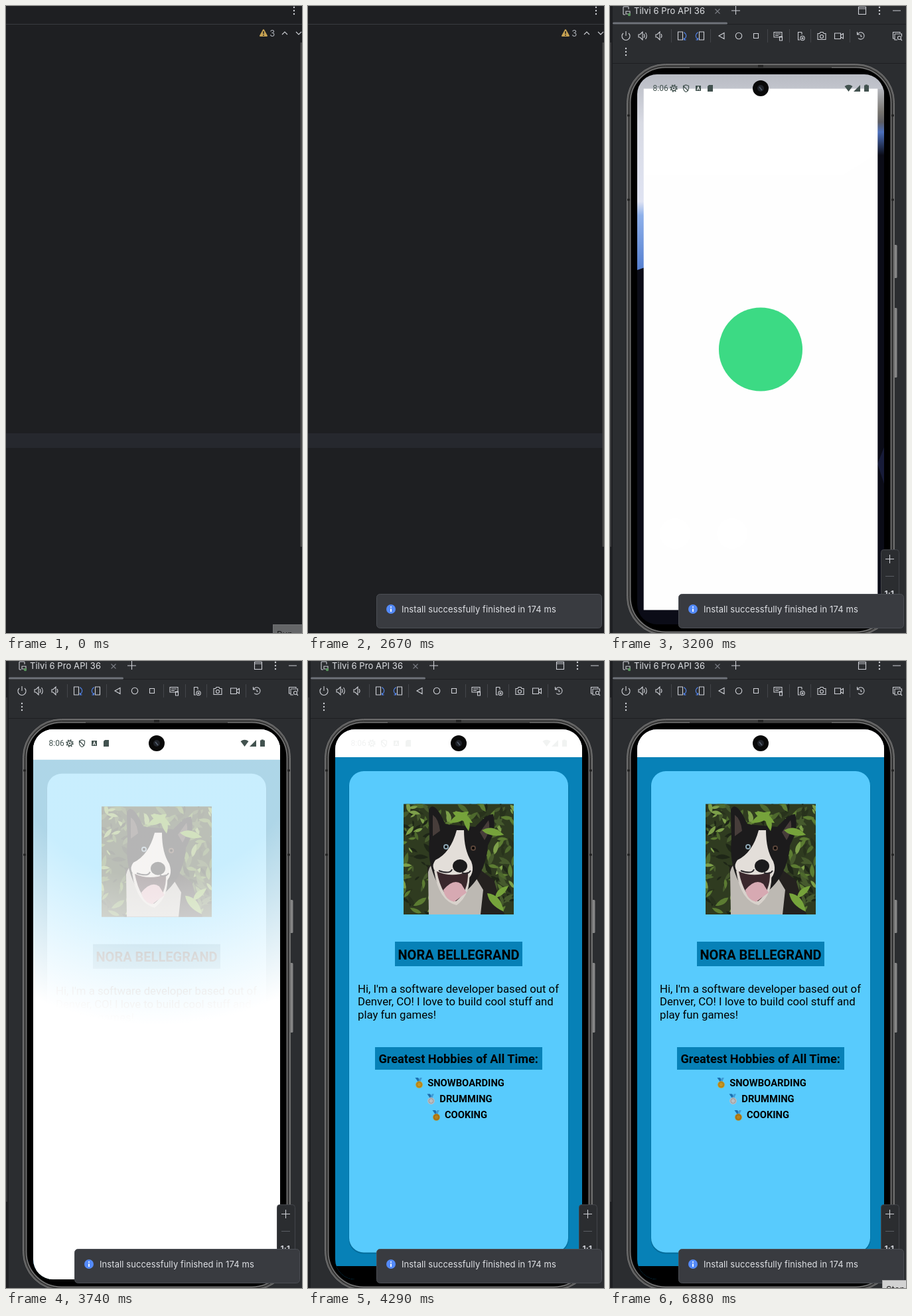
An HTML page that plays this animation: 446x945 px, repeating every 6.95 s.

```html
<!DOCTYPE html>
<html lang="en">
<head>
<meta charset="utf-8">
<style>
html, body { margin: 0; width: 100%; height: 100%; overflow: hidden; background: #1e1f22; }
svg { display: block; width: 446px; height: 945px; }
text { font: 13px Inter, sans-serif; letter-spacing: .09px; }
.phone text { font-family: Roboto, sans-serif; letter-spacing: 0; }
.phone .bold { font-weight: 700; text-anchor: middle; }
.phone .body text { font-size: 16.75px; }
.phone .hobby { font-size: 14.75px; }
.line { fill: none; stroke: #ced0d6; stroke-width: 1.1; }
.dots { fill: #ced0d6; }
</style>
</head>
<body>
<svg viewBox="0 0 446 945">
  <defs>
    <clipPath id="screen"><rect x="41" y="103" width="372" height="829" rx="30"/></clipPath>
    <clipPath id="photo"><rect x="144" y="215.500" width="166" height="166.500"/></clipPath>
    <linearGradient id="sky" x1="0" y1="103" x2="0" y2="398" gradientUnits="userSpaceOnUse">
      <stop stop-color="#b8bbc3"/><stop offset=".25" stop-color="#d9dbe4"/>
      <stop offset=".65" stop-color="#dfe3f2"/><stop offset=".72" stop-color="#8eb0ea"/><stop offset="1" stop-color="#557fd0"/>
    </linearGradient>
    <linearGradient id="stone" x1="0" y1="125" x2="0" y2="225" gradientUnits="userSpaceOnUse">
      <stop stop-color="#b5b7bd"/><stop offset=".35" stop-color="#77746f"/><stop offset=".5" stop-color="#5d5d62"/>
      <stop offset=".65" stop-color="#4c70bd"/><stop offset="1" stop-color="#0b0c17"/>
    </linearGradient>
    <radialGradient id="vanish" cx="227" cy="103" r="900" gradientUnits="userSpaceOnUse">
      <stop id="inner" stop-color="#fff"/><stop offset="1" stop-color="#fff"/>
    </radialGradient>
    <g id="medal">
      <path d="M-5.500-8H-1L3-1.500H-1Z" fill="#1c6fae"/><path d="M5-8H1.500L-1-2H2Z" fill="#3f9bd6"/>
      <circle cx=".5" cy="2.500" r="5.300"/><circle cx=".5" cy="2.500" r="3.500" fill="none" stroke="#0003"/>
    </g>
    <path id="leaf" d="M0 0Q14-13 34 0Q14 9 0 0Z"/>
  </defs>

  <rect width="446" height="945" fill="#1e1f22"/>
  <g id="editor">
    <rect y="27" width="446" height="1" fill="#393b40"/>
    <rect y="644" width="444" height="22" fill="#26282e"/>
    <rect x="443.500" y="55" width="2.500" height="760" fill="#484848"/>
    <rect y="944" width="446" height="1" fill="#17181a"/>
    <g class="dots"><circle cx="434" cy="2" r="1.200"/><circle cx="434" cy="7" r="1.200"/><circle cx="434" cy="12" r="1.200"/></g>
    <path d="M388 36L393 45H383Z" fill="#c7a252" stroke="#c7a252" stroke-width="2" stroke-linejoin="round"/>
    <path d="M388 38V42M388 43.300V45" stroke="#1e1f22" stroke-width="1.500"/>
    <text x="397.300" y="46" fill="#a9adb4">3</text>
    <path class="line" d="M416 43L420 39L424 43M437 39L441 43L445 39"/>
    <g id="runTip">
      <rect x="402.500" y="932.500" width="50" height="20" fill="#d0d0d0" stroke="#eee"/>
      <text x="408" y="951.500" fill="#000">Run</text>
    </g>
  </g>

  <g id="device">
    <rect x="4" width="442" height="945" fill="#2b2d30"/>
    <rect y="55" width="2" height="760" fill="#38393b"/>
    <rect x="4" y="27" width="442" height="1" fill="#1e1f22"/>
    <rect x="4" y="86" width="442" height="1" fill="#1e1f22"/>
    <rect x="4" y="24.500" width="173" height="3" rx="1.500" fill="#6f737a"/>
    <text x="36" y="12" fill="#dfe1e5">Tilvi 6 Pro API 36</text>
    <path class="line" d="M20 2Q20 1 21 1H27Q28 1 28 2V5M20 2V12Q20 13 21 13H23M24 8H30V12H24ZM183 7H196M189.500 0V13M374.500 1.500H385.500V12.500H374.500ZM374.500 4H385.500M426 7H438"/>
    <circle cx="29" cy="13" r="2.200" fill="#57965c"/>
    <path class="line" d="M158.500 4.500L165.500 11.500M165.500 4.500L158.500 11.500" style="stroke:#7b7e85"/>
    <g class="dots"><circle cx="406" cy="2" r="1.200"/><circle cx="406" cy="7" r="1.200"/><circle cx="406" cy="12" r="1.200"/>
      <circle cx="24" cy="64" r="1.200"/><circle cx="24" cy="69" r="1.200"/><circle cx="24" cy="74" r="1.200"/></g>
    <path d="M92.500 35V55M151.500 35V55M237.500 35V55M270.500 35V55M302.500 35V55M361.500 35V55" stroke="#43454a"/>
    <g class="line">
      <path d="M24 38V45M20 41A6 6 0 1 0 28 41"/>
      <path id="horn" d="M43 43H45L49 39V51L45 47H43ZM51 42Q53 45 51 48"/><path d="M53.500 40Q57 45 53.500 50"/>
      <use href="#horn" x="26"/>
      <path d="M102.500 39H109.500V51H102.500ZM134.500 39H141.500V51H134.500Z"/>
      <path d="M111.500 39.500Q118 45 111.500 50.500M114.500 51H111.500V48M132.500 39.500Q126 45 132.500 50.500M129.500 51H132.500V48" stroke="#548af7"/>
      <path d="M172 40.500V49.500L164 45ZM216.500 41.500H223.500V48.500H216.500Z"/><circle cx="194" cy="45" r="4.700"/>
      <path d="M247 39.500H259V47H247ZM249 42H257M249 44.500H254M255.500 46H259.500V52H255.500Z"/>
      <path d="M289 39.500H283.500V51H286M289 39.500V43"/><circle cx="290" cy="48.500" r="3.200"/><circle cx="290" cy="48.500" r="1"/>
      <path d="M313 41.500H316L317 39.500H321L322 41.500H325V50.500H313Z"/><circle cx="319" cy="46" r="2.500"/>
      <path d="M338.500 41H347.500V49.500H338.500ZM347.500 44L351.500 41.500V49L347.500 46.500"/>
      <path d="M372.500 39V43H376.500M373 43A5.200 5.200 0 1 1 374 48.500M378 43V46H380"/>
      <path d="M429 49H426.500V39.500H437V41M429 42H439.500V46M429 42V51H433"/><circle cx="436" cy="48" r="2.500"/><path d="M438 50L440 52"/>
    </g>

    <g class="phone">
      <rect x="427" y="360" width="5.500" height="50" rx="1.500" fill="#858585"/>
      <rect x="427" y="455" width="5.500" height="105" rx="1.500" fill="#858585"/>
      <rect x="25.500" y="87.500" width="403" height="861" rx="58" fill="#5c5c5c" stroke="#757575"/>
      <rect x="28.500" y="90.500" width="397" height="855" rx="55" fill="#3c3c3c" stroke="#191919"/>
      <rect x="30.500" y="92.500" width="393" height="851" rx="53" fill="#000" stroke="#6c6c6c" stroke-width="2"/>
      <path d="M120 93.500H334" stroke="#161616" stroke-width="2"/>
      <path d="M223 90.500H231M26 165H30M26 292H30M424 165H428M424 292H428" stroke="#222" stroke-width="3"/>
      <g clip-path="url(#screen)">
        <g id="home">
          <rect x="41" y="103" width="372" height="829" fill="#0b0c17"/>
          <path d="M41 103H413V215Q240 330 41 398Z" fill="url(#sky)"/>
          <path d="M398 125H413V225H398Z" fill="url(#stone)"/>
          <path d="M403 690L413 665V720Z" fill="#171b38"/>
          <g fill="#d7dbe6"><circle cx="98" cy="640" r="23"/><circle cx="184" cy="640" r="23"/><circle cx="270" cy="640" r="23"/>
            <circle cx="355" cy="640" r="23"/><circle cx="98" cy="795" r="23"/><circle cx="184" cy="795" r="23"/></g>
        </g>
        <g id="app">
          <rect x="41" y="95" width="372" height="51" fill="#fff"/>
          <rect x="41" y="145" width="372" height="790" fill="#0781b7"/>
          <rect id="nav" x="41" y="912" width="372" height="30"/>
          <rect x="61.500" y="167.500" width="331" height="726" rx="22" fill="#04618c" opacity=".65"/>
          <rect x="62" y="166" width="330" height="725.500" rx="22" fill="#58cbfd"/>
          <g clip-path="url(#photo)">
            <rect x="144" y="215" width="166" height="168" fill="#2f3b20"/>
            <g id="leaves"></g>
            <path d="M180 312Q196 292 240 300L280 330L296 382H184Z" fill="#24211f"/>
            <path d="M181 318Q186 296 202 312L222 356L250 322L264 345L260 382H182Z" fill="#bdb9b3"/>
            <path d="M183 268L182 224Q190 208 207 246L252 250Q270 230 279 231Q285 252 271 278Q268 320 240 345L205 350Q178 315 183 268Z" fill="#1c1b1c"/>
            <path d="M188 232Q197 238 199 256L188 264ZM272 240Q276 254 266 270L259 258Z" fill="#473d3a"/>
            <path d="M224 255H235Q235 285 246 302Q253 321 237 332L204 327Q181 314 192 300Q215 289 224 255Z" fill="#e3ded9"/>
            <path d="M190 316Q215 326 243 317Q246 352 224 368Q197 362 190 316Z" fill="#d8d2cc"/>
            <path d="M194 317Q215 327 241 318Q242 348 223 362Q202 358 194 317Z" fill="#3a272c"/>
            <path d="M204 345Q219 327 231 336L239 349L220 363Q206 359 204 345Z" fill="#d7a9b2"/>
            <ellipse cx="229" cy="309" rx="11" ry="10" fill="#1b1a1c"/>
            <path d="M217 314Q214 322 197 316M232 319Q240 323 245 316" fill="none" stroke="#29262a" stroke-width="2"/>
            <circle cx="208" cy="280" r="4" fill="#8ea7b4"/><circle cx="208" cy="280" r="2"/>
            <circle cx="249" cy="282" r="4" fill="#59453a"/><circle cx="249" cy="282" r="2"/>
            <g fill="#76a33b"><use href="#leaf" transform="translate(218 228) rotate(28)"/><use href="#leaf" transform="translate(242 227) rotate(150)"/>
              <use href="#leaf" transform="translate(262 255) rotate(12)"/><use href="#leaf" transform="translate(235 230) rotate(75) scale(.8)"/>
              <use href="#leaf" transform="translate(270 350) rotate(48) scale(1.100)"/><use href="#leaf" transform="translate(282 357) rotate(-42) scale(.8)"/></g>
          </g>
          <path d="M131 423H323V460H131ZM101 582H353V616H101Z" fill="#0781b7"/>
          <text class="bold" x="227" y="449.500" style="font-size:20px">NORA BELLEGRAND</text>
          <g class="body">
            <text x="75" y="499.500">Hi, I'm a software developer based out of</text>
            <text x="75" y="519.200">Denver, CO! I love to build cool stuff and</text>
            <text x="75" y="539">play fun games!</text>
          </g>
          <text class="bold" x="226.700" y="606.300" style="font-size:18.200px">Greatest Hobbies of All Time:</text>
          <text class="bold hobby" x="238" y="640.500">SNOWBOARDING</text>
          <text class="bold hobby" x="238" y="665">DRUMMING</text>
          <text class="bold hobby" x="238" y="689.300">COOKING</text>
          <use href="#medal" x="167" y="636" fill="#c9961f"/>
          <use href="#medal" x="185" y="660.500" fill="#b9bec3"/>
          <use href="#medal" x="193" y="685" fill="#b98218"/>
        </g>
        <g id="splash">
          <rect x="41" y="103" width="372" height="829" fill="#fff"/>
          <circle cx="227" cy="517.500" r="66.500" fill="#3ddb85"/>
        </g>
        <rect id="veil" x="41" y="103" width="372" height="829" fill="url(#vanish)"/>
        <g id="status" fill="#42524f">
          <text x="64.500" y="128" style="font-size:12px">8:06</text>
          <circle cx="96" cy="124" r="3.500" fill="none" stroke="#42524f" stroke-width="1.500"/>
          <circle cx="96" cy="124" r="5" fill="none" stroke="#42524f" stroke-width="1.500" stroke-dasharray="2 1.930"/>
          <circle cx="96" cy="124" r="1.300"/>
          <path d="M114.500 119L118.500 120.500V124Q118 128 114.500 129.500Q111 128 110.500 124V120.500ZM111 121L118 128" fill="none" stroke="#42524f" stroke-width="1.200"/>
          <path d="M129 120H137V128H129ZM149 119H155V129H147V121ZM353.500 121Q359.500 116.500 365.500 121L359.500 129ZM377 119V129H367ZM384.500 119.500V118.500H388V119.500H390V129H383V119.500Z"/>
          <path d="M131 127L133 121.500L135 127M131.800 125H134.200" fill="none" stroke="#fff"/>
        </g>
      </g>
      <circle cx="227" cy="124" r="12" fill="#090909"/><circle cx="227" cy="124" r="5" fill="#202329"/>
      <path d="M225 122L229 127" stroke="#566071" stroke-width="1.500"/>
    </g>
    <rect x="408.500" y="819.500" width="27" height="90" rx="4" fill="#2b2d30" stroke="#43454a"/>
    <path class="line" d="M415 833.500H428M421.500 827V840"/>
    <path d="M415 859.500H428" stroke="#5a5d63"/>
    <text x="413.500" y="890" fill="#ced0d6" style="font-size:12px;font-weight:700">1:1</text>
  </g>

  <g id="notice">
    <rect x="103.500" y="886.500" width="339" height="51" rx="5" fill="#393b40" stroke="#4b4e54"/>
    <circle cx="125" cy="909" r="7" fill="#548af7"/>
    <path d="M125 905V906.700M125 908.200V913" stroke="#fff" stroke-width="1.800"/>
    <text x="141" y="914" fill="#dfe1e5">Install successfully finished in 174 ms</text>
  </g>
  <g id="stopTip">
    <rect x="410.500" y="933.500" width="50" height="20" fill="#d2d2d2" stroke="#aaa"/>
    <text x="416" y="952" fill="#222">Stop</text>
  </g>
</svg>
<script>
const LOOP = 6950, FRAME = 70;
const el = id => document.getElementById(id);
const set = (id, name, value) => el(id).setAttribute(name, value);
const fade = (id, alpha) => set(id, 'opacity', alpha);
const show = (id, on) => set(id, 'visibility', on ? 'visible' : 'hidden');
const step = (t, start, size = FRAME) => Math.floor((t - start) / size);

// Foliage behind the dog
let seed = 7;
const rand = () => (seed = seed * 16807 % 2147483647) / 2147483647;
const greens = ['#465a2d', '#5c7c32', '#28321c', '#7d9f4a', '#4e692d', '#1e2617'];
el('leaves').innerHTML = Array.from({ length: 260 }, (_, i) =>
  `<use href="#leaf" fill="${greens[i % greens.length]}" transform="translate(${138 + rand() * 175} ${210 + rand() * 175}) rotate(${rand() * 360}) scale(${.25 + rand() * .45})"/>`
).join('');

function draw(now) {
  const t = now % LOOP;
  fade('runTip', t < 70 ? .4 : Math.max(0, .4 * (1 - (step(t, 70, 67) + 1) / 8)));
  show('notice', t >= 2670);
  fade('device', t >= 2730 ? 1 : 0);
  fade('editor', t < 2730 ? 1 : 0);

  // The splash window grows to full size.
  const open = step(t, 3130);
  const scale = open < 4 ? 1 - .116 * .45 ** open : 1;
  fade('splash', t < 3130 || t >= 3670 ? 0 : open ? .996 : .5);
  set('splash', 'transform', `translate(227 517.5) scale(${scale}) translate(-227 -517.5)`);

  // A widening circle clears the white while the page settles upward.
  const exit = step(t, 3670), leaving = exit >= 0 && exit < 5;
  const radius = Math.max(0, exit * 225);
  fade('app', exit >= 0 ? 1 : 0);
  set('app', 'transform', `translate(0 ${leaving ? 6 * .63 ** exit : 0})`);
  set('nav', 'fill', leaving ? '#8d8070' : '#000');
  fade('veil', leaving ? 1 : 0);
  if (leaving) {
    set('vanish', 'r', radius + 220);
    set('inner', 'offset', radius / (radius + 220));
    set('inner', 'stop-opacity', 1 - .1625 * (exit + 1));
  }
  fade('status', t < 4220 ? 1 : t < 4290 ? .45 : t < 5170 ? .07 : 0);
  fade('stopTip', t < 6620 ? 0 : Math.min(1, (step(t, 6620, 86.6) + 1) / 4));
}

const start = performance.now();
function tick() {
  draw(performance.now() - start);
  requestAnimationFrame(tick);
}
tick();
</script>
</body>
</html>
```
